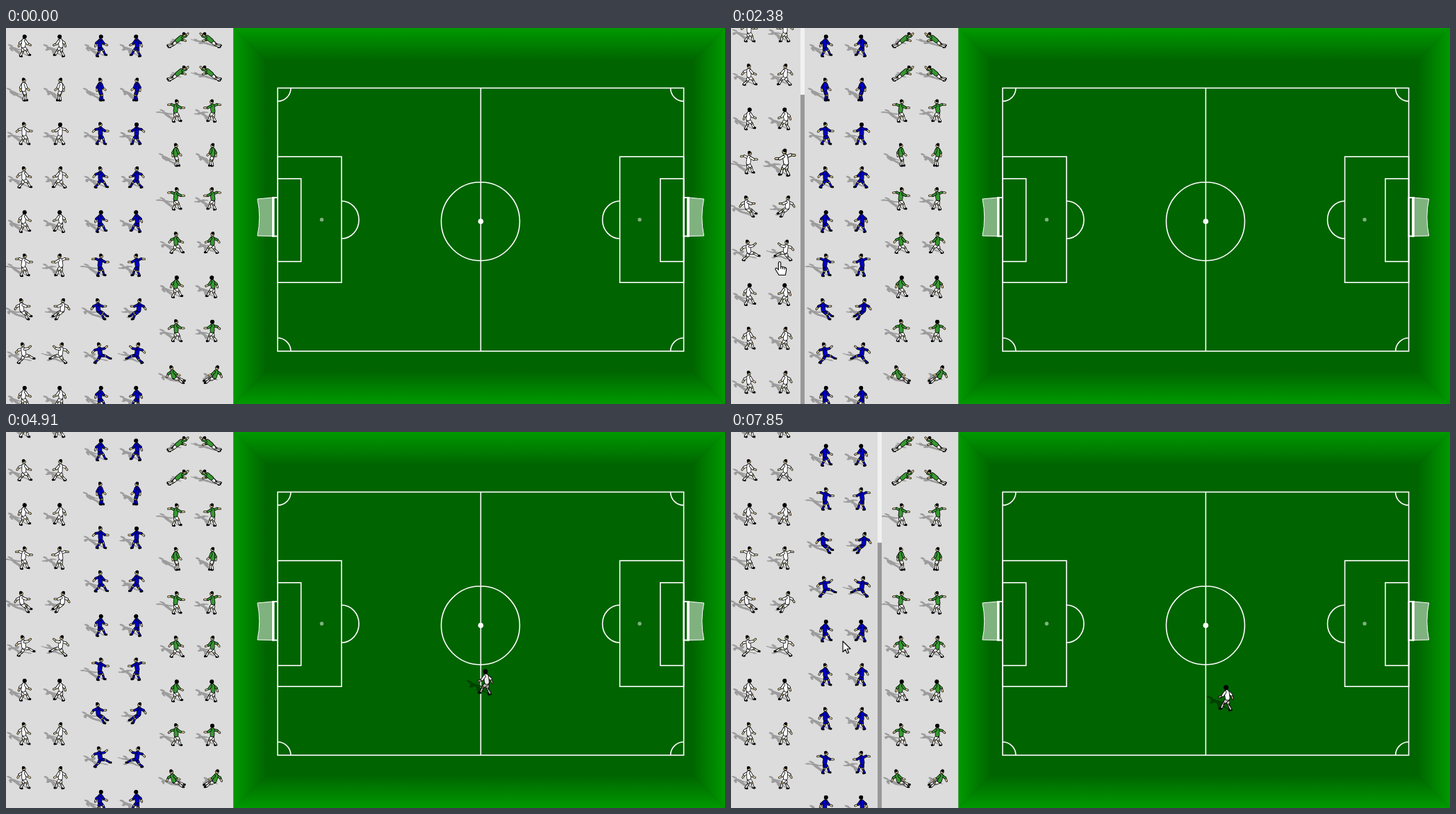
Write an HTML page with a canvas that moves like this. It is 1035 px wide and 541 px high and loops after 8000 ms.

```html
<!DOCTYPE html>
<html lang="en">
<head>
<meta charset="utf-8">
<title>Football tactics board</title>
<style>
html, body { margin: 0; width: 100%; height: 100%; overflow: hidden; background: #dcdcdc; }
canvas { display: block; }
</style>
</head>
<body>
<canvas id="stage" width="1035" height="541"></canvas>
<script>
const ctx = document.getElementById('stage').getContext('2d');
const W = 1035, H = 541, LOOP = 8000, ROW = 63.2, TWIN = 52;
const GREY = '#9c9c9c';

// Degrees from upright (trunk) or from hanging down (limbs); positive is forwards
const poses = {
  run: { trunk: 8, arms: [-35, 50], legs: [-18, 36] },
  side: { trunk: 2, arms: [-15, 35], legs: [0, 14] },
  open: { trunk: 0, arms: [-65, 70], legs: [-25, 25] },
  crouch: { trunk: 0, arms: [-55, 55], legs: [-35, 40] },
  reach: { trunk: 9, arms: [-100, 75], legs: [-14, 28] },
  slide: { trunk: -4, arms: [-50, 80], legs: [60, 35] },
  lunge: { trunk: -8, arms: [-60, 115], legs: [-40, 72] },
  stand: { trunk: 0, arms: [-45, 45], legs: [-20, 27] },
  dive: { trunk: 50, arms: [60, 125], legs: [-65, -55] },
  lie: { trunk: -15, arms: [-40, 60], legs: [75, 60] }
};
const outfield = 'run side open crouch run reach slide lunge run stand stand reach run'.split(' ');
const keepers = 'dive dive reach side reach crouch run open lie'.split(' ');

const kit = (shirt, shorts, skin = '#f3e0a2') => ({ shirt, shorts, skin });
const WHITE = kit('#fff', '#fff'), BLUE = kit('#0000c4', '#0000c4'), GREEN = kit('#389832', '#fff');
const PRESSED = kit('#d4d4d4', '#c4c4c4', '#cfc8b0'), ON_PITCH = kit('#fff', '#c8c4c0', '#b5a58c');

const clamp = v => Math.max(0, Math.min(1, v));
const progress = (t, a, b) => clamp((t - a) / (b - a));
const smooth = p => p * p * (3 - 2 * p);
const easeOut = p => 1 - (1 - p) ** 2;
const mix = (a, b, p) => a.map((v, i) => v + (b[i] - v) * p);
const polar = ([x, y], deg, r) => {
  const a = deg * Math.PI / 180;
  return [x + r * Math.sin(a), y + r * Math.cos(a)];
};

function line(a, b, width, color) {
  ctx.strokeStyle = color;
  ctx.lineWidth = width;
  ctx.beginPath();
  ctx.moveTo(...a);
  ctx.lineTo(b[0] + .01, b[1]);
  ctx.stroke();
}

// Centres the figure on its cell, then builds it from the hip outwards
function figure({ trunk, arms, legs }, { shirt, shorts, skin }, back) {
  const head0 = polar([0, 0], 180 - trunk, 15);
  const feet0 = legs.map(a => polar([0, 0], a, 14));
  const low = Math.max(feet0[0][1], feet0[1][1]);
  const hip = [
    -(head0[0] + (feet0[0][0] + feet0[1][0]) / 2) / 3,
    (3 - head0[1] - low) / 2
  ];
  const head = [hip[0] + head0[0], hip[1] + head0[1]];
  const chest = mix(head, hip, .4);
  const arm = i => {
    const from = [chest[0] + (i ? 2 : -2), chest[1]];
    const elbow = polar(from, arms[i] - 15, 5), hand = polar(elbow, arms[i] + 15, 5);
    return [[elbow, hand, 1.5, skin], [from, elbow, 2.3, shirt]];
  };
  const leg = a => {
    const knee = polar(hip, a + 12, 7), foot = polar(knee, a - 12, 7);
    return [
      [foot, [foot[0] + 2, foot[1] + .4], 1.6, '#000'],
      [knee, mix(knee, foot, .85), 1.7, shorts],
      [hip, knee, 2, skin],
      [hip, mix(hip, knee, .6), 3.4, shorts]
    ];
  };
  const hair = [head[0] - (back ? 0 : .7), head[1] - (back ? 0 : 1.5)];
  const parts = [
    ...arm(0), ...leg(legs[0]), ...leg(legs[1]),
    [chest, mix(chest, hip, .8), 5.2, shirt],
    ...arm(1),
    [head, head, 4, skin],
    [hair, hair, back ? 4.4 : 3, '#000']
  ];
  return { parts, ground: hip[1] + low };
}

function player(x, y, name, dir, colors, { scale = 1, shadow = GREY } = {}) {
  const back = name === 'run' || name === 'open' && dir < 0;
  const { parts, ground } = figure(poses[name], colors, back);
  ctx.save();
  ctx.lineCap = 'round';
  ctx.translate(x, y);
  ctx.scale(scale, scale);
  ctx.save();
  ctx.translate(0, ground);
  ctx.transform(.9, 0, .72, .55, 0, 0);
  ctx.scale(dir, 1);
  ctx.translate(0, -ground);
  for (const [a, b, w] of parts) line(a, b, w + 1.6, shadow);
  ctx.restore();
  ctx.scale(dir, 1);
  for (const [a, b, w, color] of parts) {
    line(a, b, w + 1.5, '#000');
    line(a, b, w, color);
  }
  ctx.restore();
}

function outfieldColumn(x, scroll, colors, active = {}) {
  outfield.forEach((name, row) => {
    const y = 25 + ROW * row - scroll, on = active.row === row;
    player(x, y, name, 1, colors);
    player(x + TWIN, y, name, -1, on && active.pressed ? PRESSED : colors, { scale: on ? 1.2 : 1 });
  });
}

function keeperColumn() {
  keepers.forEach((name, row) => {
    const y = row < 2 ? 17 + 48 * row : 119 + ROW * (row - 2);
    player(245, y, name, 1, GREEN);
    player(245 + TWIN, y, name, -1, GREEN);
  });
}

function scrollbar(x, scroll) {
  ctx.fillStyle = '#f1f1f1';
  ctx.fillRect(x, 0, 6, H);
  ctx.fillStyle = '#999';
  ctx.fillRect(x, scroll * .65, 6, 470);
}

function grass() {
  const L = 327.5, B = 48;
  ctx.fillStyle = '#006400';
  ctx.fillRect(L, 0, W - L, H);
  const outer = [[L, 0], [W, 0], [W, H], [L, H]];
  const inner = [[L + B, B], [W - B, B], [W - B, H - B], [L + B, H - B]];
  outer.forEach(([x, y], i) => {
    const j = (i + 1) % 4, [ix, iy] = inner[i];
    const g = i % 2 ? ctx.createLinearGradient(x, 0, ix, 0) : ctx.createLinearGradient(0, y, 0, iy);
    g.addColorStop(0, '#009a00');
    g.addColorStop(1, '#006400');
    ctx.fillStyle = g;
    ctx.beginPath();
    [outer[i], outer[j], inner[j], inner[i]].forEach(p => ctx.lineTo(...p));
    ctx.fill();
  });
}

function dot(x, y, r, color) {
  ctx.fillStyle = color;
  ctx.beginPath();
  ctx.arc(x, y, r, 0, 7);
  ctx.fill();
}

function pitchEnd() {
  ctx.strokeStyle = '#fff';
  ctx.lineWidth = 1.6;
  ctx.strokeRect(391, 185.2, 92, 181);
  ctx.strokeRect(391, 216.8, 33.7, 119.2);
  ctx.beginPath();
  ctx.ellipse(483, 276, 25, 27, 0, -Math.PI / 2, Math.PI / 2);
  ctx.moveTo(410, 86.4);
  ctx.arc(391, 86.4, 19, 0, Math.PI / 2);
  ctx.moveTo(391, 446);
  ctx.arc(391, 465, 19, -Math.PI / 2, 0);
  ctx.stroke();
  dot(454.5, 275.7, 2.7, '#80b280');

  ctx.fillStyle = '#80b280';
  ctx.lineWidth = 1;
  ctx.beginPath();
  ctx.moveTo(384, 244);
  ctx.lineTo(362, 246);
  ctx.quadraticCurveTo(367.5, 272, 362, 299);
  ctx.lineTo(384, 299.5);
  ctx.fill();
  ctx.stroke();
  ctx.lineWidth = 2;
  ctx.strokeRect(384, 244, 7, 55.5);
  ctx.fillStyle = '#fff';
  ctx.fillRect(383, 243, 3.5, 57.5);
}

function pitch() {
  grass();
  pitchEnd();
  ctx.save();
  ctx.translate(1366.6, 0);
  ctx.scale(-1, 1);
  pitchEnd();
  ctx.restore();
  ctx.strokeStyle = '#fff';
  ctx.lineWidth = 1.6;
  ctx.strokeRect(391, 86.4, 584.6, 378.6);
  ctx.beginPath();
  ctx.moveTo(683.4, 86);
  ctx.lineTo(683.4, 465);
  ctx.moveTo(739.5, 278.3);
  ctx.arc(683, 278.3, 56.5, 0, 7);
  ctx.stroke();
  dot(683.4, 278.3, 3.8, '#fff');
}

const arrow = new Path2D('M0 0V15.5L3.7 12 6.2 17.5 8.6 16.5 6.2 11H11Z');
const hand = new Path2D('M-1.7 1.5Q0-1 1.7 1.5V7L8 8.5Q10 9 9.7 12L8.3 19.5H-1L-6 11.5Q-6.5 9-4 9.5L-1.7 12Z');
const knuckles = new Path2D('M1.7 7V10.5M4.3 8V11M7 8.5V11.5');

function cursor([x, y], isHand) {
  const shape = isHand ? hand : arrow;
  ctx.save();
  ctx.translate(x, y);
  ctx.fillStyle = '#fff';
  ctx.strokeStyle = '#000';
  ctx.lineWidth = 1.1;
  ctx.lineJoin = 'round';
  ctx.fill(shape);
  ctx.stroke(shape);
  if (isHand) ctx.stroke(knuckles);
  ctx.restore();
}

// Follows key points [start, end, target] from a first position
function follow(t, at, ...keys) {
  for (const [start, end, target] of keys) at = mix(at, target, smooth(progress(t, start, end)));
  return at;
}

const pointer = t => t < 5730
  ? follow(t, [0, 400], [430, 1270, [70, 336]], [2780, 3330, [80, 384]], [3460, 3670, [74, 373]])
  : follow(t, [716, 384], [5730, 6560, [209, 361]], [6560, 6900, [161, 301]]);

function dragged(t) {
  const at = follow(t, [78, 372], [3950, 4780, [675, 343]]);
  return mix(at, [713.5, 382], easeOut(progress(t, 4780, 5340)));
}

function draw(t) {
  const whiteScroll = 160 * smooth(progress(t, 1700, 2520));
  const blueScroll = 245 * easeOut(progress(t, 7235, 7850));
  const dragging = t >= 3960, at = pointer(t), piece = dragged(t);
  const active = t >= 1130 && t < 2850 ? { row: 5 }
    : t >= 3120 && !dragging ? { row: 8, pressed: t >= 3300 } : {};

  ctx.fillStyle = '#dcdcdc';
  ctx.fillRect(0, 0, W, H);
  outfieldColumn(26, whiteScroll, WHITE, active);
  outfieldColumn(136, blueScroll, BLUE);
  keeperColumn();
  if (t >= 500 && (!dragging || piece[0] < 106)) scrollbar(100, whiteScroll);
  if (t >= 5800 && at[0] < 217) scrollbar(211, blueScroll);
  pitch();

  if (dragging) {
    ctx.globalAlpha = t < 5540 ? .9 : 1;
    player(...piece, 'run', -1, ON_PITCH, { scale: 1.15, shadow: piece[0] < 327 ? GREY : '#004000' });
    ctx.globalAlpha = 1;
  }
  if (t >= 500 && !dragging || t >= 5800) cursor(at, t >= 1130 && !dragging);
}

const start = performance.now();
function tick() {
  draw((performance.now() - start) % LOOP);
  requestAnimationFrame(tick);
}
tick();
</script>
</body>
</html>
```
